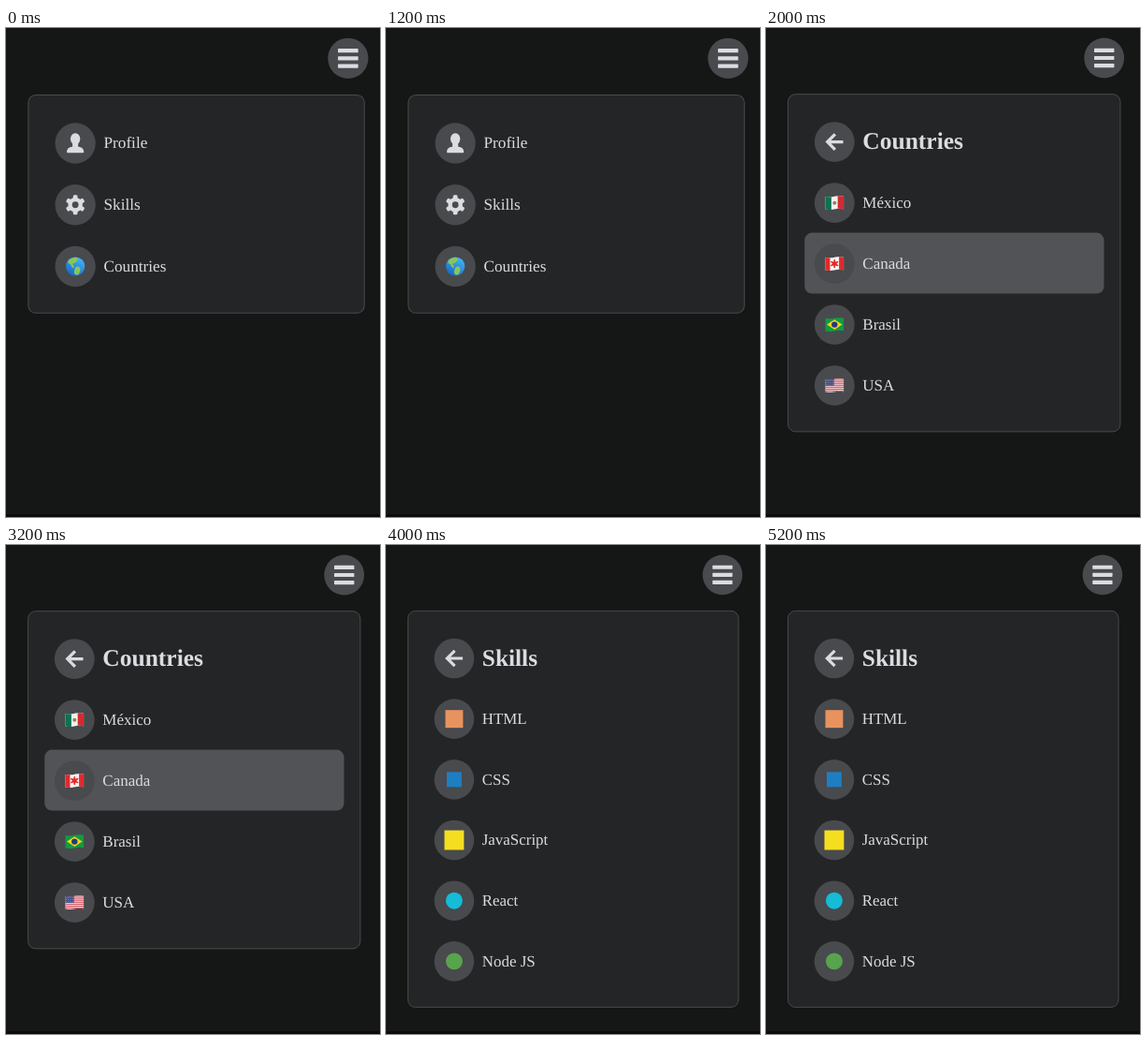
These frames come from a looping animation (400 px wide and 522 px high, 6000 ms). An HTML page with a canvas:

```html
<!DOCTYPE html>
<html lang="en">
<head>
<meta charset="utf-8">
<title>Dropdown menu</title>
<style>
  html, body { margin: 0; width: 100%; height: 100%; overflow: hidden; background: #151716; }
  canvas { display: block; width: 400px; height: 522px; }
</style>
</head>
<body>
<canvas id="stage" width="400" height="522"></canvas>
<script>
const ctx = document.getElementById('stage').getContext('2d');
const TAU = Math.PI * 2;
const VIEW_MS = 2000;
const ROW = 65;
const INK = '#dadce1', BUTTON = '#484a4d', PANEL = '#242526', HOVER = '#525357';

function oval(x, y, rx, ry, color, tilt = 0) {
  ctx.fillStyle = color;
  ctx.beginPath();
  ctx.ellipse(x, y, rx, ry, tilt, 0, TAU);
  ctx.fill();
}

const disc = (x, y, r, color) => oval(x, y, r, r, color);

function rect(x, y, w, h, color) {
  ctx.fillStyle = color;
  ctx.fillRect(x, y, w, h);
}

function roundRect(x, y, w, h, r, color) {
  ctx.fillStyle = color;
  ctx.beginPath();
  ctx.roundRect(x, y, w, h, r);
  ctx.fill();
}

// Closed outline whose radius depends on the angle, measured from the top
function polar(radius, color, steps = 120, squash = 1) {
  ctx.fillStyle = color;
  ctx.beginPath();
  for (let i = 0; i < steps; i++) {
    const a = i / steps * TAU, r = radius(a);
    ctx.lineTo(r * Math.sin(a), -r * Math.cos(a) * squash);
  }
  ctx.closePath();
  ctx.fill();
}

// Plain badges
const square = (size, color) => () => rect(-size / 2, -size / 2, size, size, color);
const dot = (r, color) => () => disc(0, 0, r, color);

function bars() {
  for (let i = -1; i <= 1; i++) roundRect(-10.7, i * 8.1 - 2.1, 21.4, 4.2, 0.6, INK);
}

function backArrow() {
  ctx.strokeStyle = INK;
  ctx.lineWidth = 3.2;
  ctx.beginPath();
  ctx.moveTo(9.2, 0);
  ctx.lineTo(-7, 0);
  ctx.moveTo(0.6, -8.2);
  ctx.lineTo(-7.6, 0);
  ctx.lineTo(0.6, 8.2);
  ctx.stroke();
}

function person() {
  oval(0, -4.6, 5.1, 6, INK);
  rect(-3, -1, 6, 7, INK);
  roundRect(-9, 3.6, 18, 6.6, [6, 6, 1, 1], INK);
}

function gear() {
  polar(a => 9 + 1.4 * Math.tanh(4 * Math.cos(6 * a)), INK);
  disc(0, 0, 3.4, BUTTON);
}

function globe() {
  const sea = ctx.createLinearGradient(5, -9, -5, 9);
  sea.addColorStop(0, '#42b4f7');
  sea.addColorStop(1, '#1769c4');
  ctx.save();
  disc(0, 0, 10, sea);
  ctx.clip();
  const land = '#8cc457';
  oval(-2.5, -6, 5.5, 3, land, -0.4);
  oval(-3.5, -1.5, 1.2, 3.5, land, -0.5);
  oval(2, 4.5, 3, 4.5, land, 0.3);
  ctx.restore();
}

// Paints inside a gently waving flag outline
const flag = paint => () => {
  const wave = x => 0.6 * Math.sin(x / 10 * Math.PI);
  ctx.save();
  ctx.beginPath();
  for (let x = -10; x <= 10; x++) ctx.lineTo(x, -6.8 - wave(x));
  for (let x = 10; x >= -10; x--) ctx.lineTo(x, 6.8 - wave(x));
  ctx.clip();
  paint();
  ctx.restore();
};

function bands(left, middle, right, side) {
  rect(-10, -9, 20, 18, middle);
  rect(-10, -9, side, 18, left);
  rect(10 - side, -9, side, 18, right);
}

const mexico = flag(() => {
  bands('#0a7350', '#f1f1ee', '#d22a35', 6.6);
  disc(0, 0.2, 2, '#97805a');
});

const canada = flag(() => {
  bands('#df2a2a', '#f6f5f3', '#df2a2a', 5.2);
  polar(a => 3.4 + 1.3 * Math.cos(6 * a), '#df2a2a');
});

const brasil = flag(() => {
  rect(-10, -9, 20, 18, '#129a45');
  polar(() => 8.2, '#fcd21c', 4, 0.66);
  disc(0, 0, 3.2, '#263a7c');
});

const usa = flag(() => {
  rect(-10, -9, 20, 18, '#eee8ea');
  for (let i = 0; i < 7; i++) rect(-10, -7.2 + i * 2.12, 20, 1.1, '#cd4a58');
  rect(-10, -9, 9.4, 9.4, '#464f83');
  for (let i = 0; i < 12; i++) disc(-8.7 + i % 4 * 2.2, -5.3 + Math.floor(i / 4) * 2.2, 0.4, '#c9cddd');
});

const views = [
  { scale: 1.0115, rows: [[person, 'Profile'], [gear, 'Skills'], [globe, 'Countries']] },
  { scale: 1, titled: true, hover: 2, rows: [
    [backArrow, 'Countries'], [mexico, 'México'], [canada, 'Canada'], [brasil, 'Brasil'], [usa, 'USA']] },
  { scale: 0.995, titled: true, rows: [
    [backArrow, 'Skills'],
    [square(19, '#e8935f'), 'HTML'],
    [square(16, '#1d7fc2'), 'CSS'],
    [square(21, '#f5dd20'), 'JavaScript'],
    [dot(9, '#14bcd8'), 'React'],
    [dot(9, '#58a34d'), 'Node JS']] }
];

function button(x, y, icon) {
  ctx.save();
  ctx.translate(x, y);
  disc(0, 0, 21.4, BUTTON);
  icon();
  ctx.restore();
}

function drawView({ scale, titled, hover, rows }) {
  ctx.setTransform(1, 0, 0, 1, 0, 0);
  rect(0, 0, 400, 522, '#151716');
  rect(0, 519, 400, 3, '#0e0b0c');
  ctx.scale(scale, scale);
  ctx.textRendering = 'geometricPrecision';
  button(361.7, 32, bars);

  roundRect(23.6, 70.7, 355.3, rows.length * ROW + 35.2, 8, PANEL);
  ctx.strokeStyle = '#474a4d';
  ctx.lineWidth = 1;
  ctx.stroke();

  rows.forEach(([icon, label], i) => {
    const y = 121.6 + i * ROW;
    const isTitle = titled && i === 0;
    if (i === hover) roundRect(41.3, y - 33, 320.2, ROW, 8, HOVER);
    button(73.3, y, icon);
    ctx.fillStyle = INK;
    ctx.font = `${isTitle ? 'bold 25.5px' : '17px'} "Liberation Serif", "Times New Roman", serif`;
    ctx.fillText(label, 103.3, y + (isTitle ? 7.6 : 5.2));
  });
}

function tick() {
  drawView(views[Math.floor(performance.now() / VIEW_MS) % views.length]);
  requestAnimationFrame(tick);
}
tick();
</script>
</body>
</html>
```
